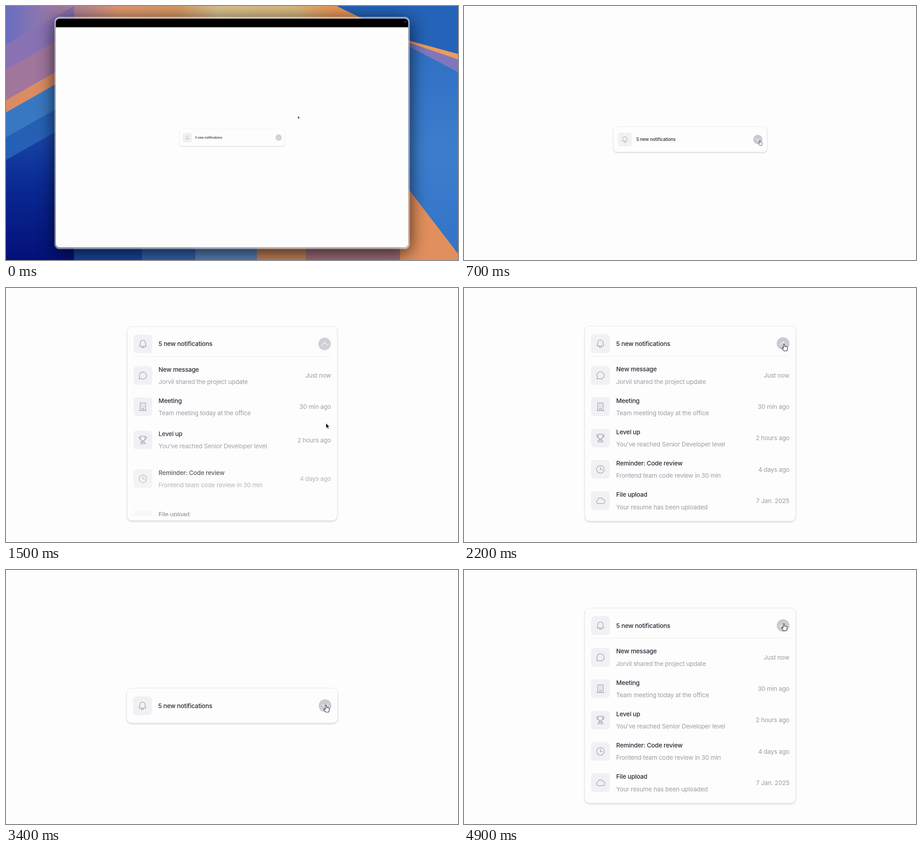
These frames come from a looping animation (998x561 px, 5 s). An HTML page:

```html
<!DOCTYPE html>
<html lang="en">
<head>
<meta charset="utf-8">
<title>Notifications</title>
<style>
  html, body { margin: 0; width: 100%; height: 100%; overflow: hidden; background: #fcfcfc; }
  svg { display: block; width: 998px; height: 561px; }
  text { font: 400 13.6px Inter, Roboto, sans-serif; letter-spacing: -.2px; fill: #9c9ca6; }
  text.title { font-weight: 500; fill: #292936; }
  text.time { text-anchor: end; }
  .icon { fill: none; stroke: #9d9da6; stroke-width: 1.25; stroke-linecap: round; stroke-linejoin: round; }
  .card { fill: #fdfdfd; stroke: #e7e7ea; filter: drop-shadow(0 2px 1.5px rgba(30, 30, 45, .16)); }
</style>
</head>
<body>
<svg viewBox="0 0 998 561" xmlns="http://www.w3.org/2000/svg">
  <defs>
    <linearGradient id="sunset">
      <stop offset="0" stop-color="#686dc0"/><stop offset=".12" stop-color="#a27ba4"/>
      <stop offset=".25" stop-color="#e39a70"/><stop offset=".38" stop-color="#d99a66"/>
      <stop offset=".47" stop-color="#dcc490"/><stop offset=".64" stop-color="#dcba80"/>
      <stop offset=".72" stop-color="#e8985a"/>
    </linearGradient>
    <linearGradient id="sea" x2="0" y2="1">
      <stop offset="0" stop-color="#1c4dae"/><stop offset=".45" stop-color="#0a2a94"/>
      <stop offset="1" stop-color="#04107a"/>
    </linearGradient>
    <linearGradient id="sky" x2="0" y2="1">
      <stop offset="0" stop-color="#2f6fc2"/><stop offset=".5" stop-color="#3d7dce"/>
      <stop offset="1" stop-color="#3373c6"/>
    </linearGradient>
    <filter id="blur" x="-20%" y="-20%" width="140%" height="140%"><feGaussianBlur stdDeviation="38"/></filter>
    <clipPath id="listClip"><rect id="listBox" x="-232" width="464"/></clipPath>
  </defs>
  <g id="wallpaper">
    <rect width="998" height="561" fill="url(#sunset)"/>
    <path d="M730 0L888 77 998 106V0Z" fill="#2463b8"/>
  </g>
  <g id="camera">
    <rect x="-785" y="-520" width="1570" height="1030" rx="24" opacity=".7" filter="url(#blur)"/>
    <rect x="-785" y="-533" width="1569" height="1026" rx="22" fill="#fff" opacity=".5"/>
    <rect x="-779" y="-525" width="1556" height="1010" rx="16" fill="#fdfdfd"/>
    <path d="M-779-487V-509a16 16 0 0 1 16-16H761a16 16 0 0 1 16 16V-487Z"/>
    <circle cx="764" cy="-511" r="3" fill="#4d5478"/>
    <rect class="card" id="card" x="-233" width="466" rx="11"/>
    <g id="list" clip-path="url(#listClip)"></g>
    <g id="header">
      <path id="divider" d="M-218.5 66.8H219" stroke="#eeeef1"/>
      <circle id="button" cx="205" cy="38.7" r="14"/>
      <path id="chevron" class="icon" d="M-6.8-3.2L0 3.6 6.8-3.2" style="stroke:#f4f4f7;stroke-width:1.5"/>
    </g>
    <g id="cursor" stroke-linejoin="round">
      <path id="arrow" d="M0 0V12L2.8 9.4 4.6 13.6 6.7 12.7 4.9 8.6H8.8Z" fill="#16161c" stroke="#fff"/>
      <path id="hand" d="M-1.3 9.4V1.3a1.3 1.3 0 0 1 2.6 0V5.6q1.2-.8 2.1.2 1.3-.6 2.1.5 1.5-.1 1.7 1.4V10.5q0 2.8-1.5 5H-.4Q-2.2 13-4.3 10.3q-.8-1.7.9-1.9Q-2.4 8.5-1.3 9.4Z" fill="#fff" stroke="#24242c" stroke-width="1.1"/>
      <g id="beam" fill="none">
        <path id="beamLine" d="M-3-7Q0-7 0-5 0-7 3-7M0-5V5M-3 7Q0 7 0 5 0 7 3 7M-2 2H2" stroke="#fff" stroke-width="2.6"/>
        <use href="#beamLine" style="filter:brightness(.15)" transform="scale(.98)" opacity="0"/>
        <path d="M-3-7Q0-7 0-5 0-7 3-7M0-5V5M-3 7Q0 7 0 5 0 7 3 7M-2 2H2" stroke="#24242c" stroke-width="1.3"/>
      </g>
    </g>
  </g>
</svg>
<script>
const LOOP = 5000, CLOSED = 77, OPEN = 431, DROP = 88;
const FIRST_OPEN = 1132, CLOSE = 2457, SECOND_OPEN = 3675;
const DURATION = 300, STAGGER = 55;
const ROW_TOP = 109, ROW_PITCH = 69.2, BUTTON_X = 205, HEADER_Y = 38.7;

const windows = [-5, -2, 1].flatMap(y => [-3, 0, 3].map(x => `M${x} ${y}h.1`)).join('');
const ICONS = {
  bell: 'M-7.4 4.6C-5.7 2.6-5.6 .6-5.6-2.6a5.6 5.6 0 0 1 11.2 0C5.6 .6 5.7 2.6 7.4 4.6Q7.4 5.5 6.4 5.5H-6.4Q-7.4 5.5-7.4 4.6ZM-2.7 5.8a2.7 2.9 0 0 0 5.4 0',
  chat: 'M-8 7.8L-6.8 3.8A8 7.9 0 1 1-3.8 6.8Z',
  building: 'M-6 8.4V-8.4H6V8.4M-8 8.4H8M-2 8.4V4H2V8.4' + windows,
  trophy: 'M-5-8.4H5V-4Q5 2 0 2-5 2-5-4ZM-5-6.6H-8.3Q-8.3-1.2-4-.8M5-6.6H8.3Q8.3-1.2 4-.8M-2 2Q-1.4 4-3.4 5H3.4Q1.4 4 2 2M-3.4 5Q-5 5.6-5.4 8.4H5.4Q5 5.6 3.4 5',
  clock: 'M-8.4 0a8.4 8.4 0 1 1 16.8 0a8.4 8.4 0 1 1-16.8 0M0-5V.4H4.6',
  cloud: 'M-4.4 6.6A4.3 4.3 0 0 1-5.4-1.8 5.6 5.6 0 0 1 5.2-3.2 4.9 4.9 0 0 1 4.8 6.6Z'
};

const ROWS = [
  ['chat', 'New message', 'Jorvil shared the project update', 'Just now'],
  ['building', 'Meeting', 'Team meeting today at the office', '30 min ago'],
  ['trophy', 'Level up', "You've reached Senior Developer level", '2 hours ago'],
  ['clock', 'Reminder: Code review', 'Frontend team code review in 30 min', '4 days ago'],
  ['cloud', 'File upload', 'Your resume has been uploaded', '7 Jan. 2025']
];

// Cursor legs in camera space; bow pushes the middle of a leg sideways
const START = { x: 290, y: -95 };
const MOVES = [
  { from: 0, to: 700, x: 211, y: 3 },
  { from: 700, to: 1400, x: 206, y: 1.5 },
  { from: 1450, to: 2150, x: 207.5, y: -176, bow: 36 },
  { from: 2680, to: 3150, x: 207, y: -1 },
  { from: 4350, to: 4890, x: 206.5, y: -181 }
];

const $ = id => document.getElementById(id);
const set = (el, attrs) => { for (const k in attrs) el.setAttribute(k, attrs[k]); };
const add = (parent, tag, attrs, text) => {
  const el = document.createElementNS('http://www.w3.org/2000/svg', tag);
  set(el, attrs);
  if (text) el.textContent = text;
  return parent.appendChild(el);
};
const clamp = x => Math.min(1, Math.max(0, x));
const ease = x => { x = clamp(x); return x * x * (3 - 2 * x); };

// Fills everything below a straight edge
const band = (fill, x0, y0, x1, y1) =>
  add($('wallpaper'), 'path', { fill, d: `M${x0} ${y0}L${x1} ${y1}V561H${x0}Z` });

function paintWallpaper() {
  const left = { '#8872b4': 85, '#a0769c': 140, '#da8c64': 208, '#3878c2': 235, '#2660b6': 290, 'url(#sea)': 340 };
  for (const fill in left) band(fill, 0, left[fill], 150, left[fill] - 85);
  const bottom = { '#1a469f': 150, '#3463ad': 300, '#5b82bd': 418, '#c9855c': 554, '#a2707c': 662 };
  for (const fill in bottom) band(fill, bottom[fill], 500, 998, 500);
  band('#ec9b5a', 870, 71, 998, 106);
  band('#7f77bd', 870, 74, 998, 118);
  band('url(#sky)', 870, 79, 998, 146);
  band('#e18f5c', 870, 380, 998, 547);
}

function addIcon(parent, name, y) {
  add(parent, 'rect', { x: -219, y: y - 20.7, width: 41.4, height: 41.4, rx: 7, fill: '#f1f1f5' });
  add(parent, 'path', { d: ICONS[name], class: 'icon', transform: `translate(-198.3 ${y})` });
}

paintWallpaper();
addIcon($('header'), 'bell', HEADER_Y);
add($('header'), 'text', { x: -163.5, y: HEADER_Y + 5, class: 'title' }, '5 new notifications');

const rows = ROWS.map(([icon, title, detail, time]) => {
  const row = add($('list'), 'g', {});
  addIcon(row, icon, 0);
  add(row, 'text', { x: -163.5, y: -8.6, class: 'title' }, title);
  add(row, 'text', { x: -163.5, y: 18.8 }, detail);
  add(row, 'text', { x: 219, y: 5, class: 'time' }, time);
  return row;
});

function openness(t, delay, closeDelay) {
  if (t >= CLOSE && t < SECOND_OPEN) return 1 - ease((t - CLOSE - closeDelay) / DURATION);
  return ease((t - (t < CLOSE ? FIRST_OPEN : SECOND_OPEN) - delay) / DURATION);
}

// Critically damped spring from half size to full size
function zoom(t) {
  const x = Math.max(0, t - 460) * .0064;
  return 1 - .5 * (1 + x) * Math.exp(-x);
}

function cursorAt(t) {
  let { x, y } = START;
  for (const move of MOVES) {
    const k = ease((t - move.from) / (move.to - move.from));
    x += (move.x - x) * k + (move.bow || 0) * Math.sin(Math.PI * k);
    y += (move.y - y) * k;
  }
  return [x, y];
}

function render(t) {
  const scale = zoom(t), open = openness(t, 0, 0);
  const height = CLOSED + (OPEN - CLOSED) * open, top = -height / 2;
  set($('camera'), { transform: `translate(499.5 ${281.5 + 18 * scale}) scale(${scale})` });
  set($('card'), { y: top, height });
  set($('header'), { transform: `translate(0 ${top})` });
  set($('divider'), { opacity: open * open });
  set($('listBox'), { y: top + 67, height: height - CLOSED });

  const [x, y] = cursorAt(t);
  let overText = false;
  rows.forEach((row, i) => {
    const shown = openness(t, i * STAGGER, 17);
    const rowY = -OPEN / 2 + ROW_TOP + i * ROW_PITCH + DROP * (1 - shown);
    set(row, { transform: `translate(0 ${rowY})`, opacity: shown });
    if (shown > .1 && x < 219 && Math.abs(y - rowY) < 9) overText = true;
  });

  const turn = 180 * ease(open * 1.25 - .1);
  set($('chevron'), { transform: `translate(${BUTTON_X} ${HEADER_Y}) rotate(${turn})` });

  const overButton = Math.hypot(x - BUTTON_X, y - top - HEADER_Y) < 14;
  set($('button'), { fill: overButton ? '#cacad2' : '#d0d0d8' });
  const shape = overButton ? 'hand' : overText ? 'beam' : 'arrow';
  for (const id of ['arrow', 'hand', 'beam']) set($(id), { display: id === shape ? 'inline' : 'none' });
  set($('cursor'), { transform: `translate(${x} ${y})` });
}

const start = performance.now();
function tick() {
  render((performance.now() - start) % LOOP);
  requestAnimationFrame(tick);
}
tick();
</script>
</body>
</html>
```
